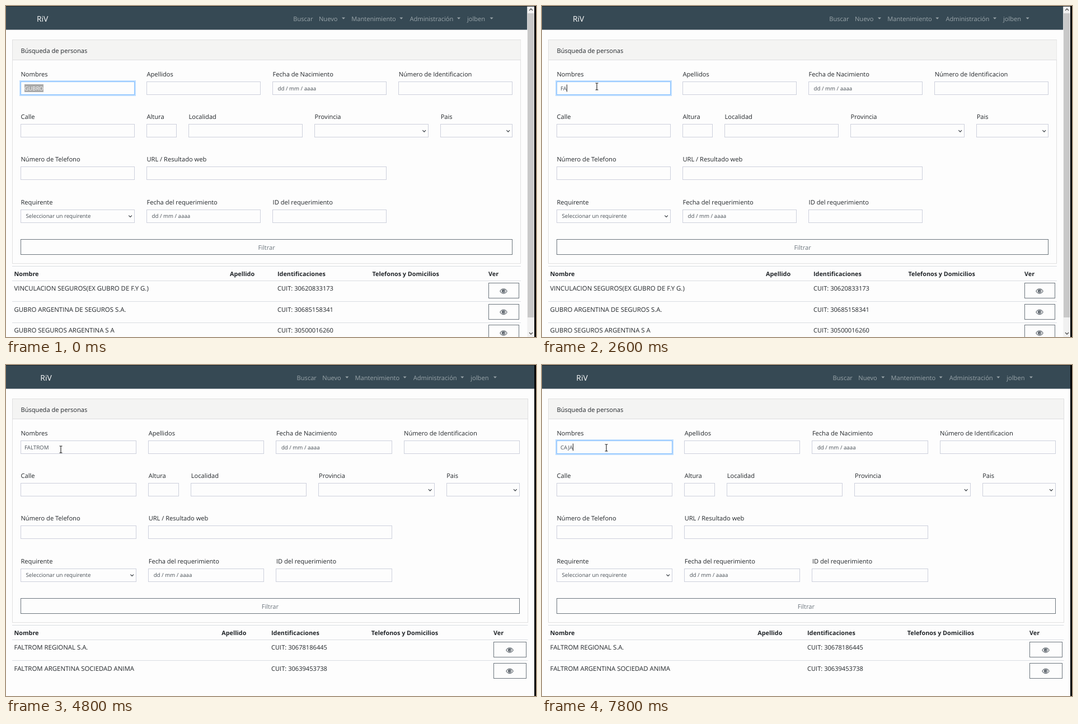
An HTML page that plays this animation: 947 px wide and 592 px high, repeating every 8 s.

```html
<!DOCTYPE html>
<html lang="es">
<head>
<meta charset="utf-8">
<title>Búsqueda de personas</title>
<style>
html, body { margin: 0; width: 100%; height: 100%; overflow: hidden; background: #fdfdfd; }
svg { display: block; width: 947px; height: 592px; }
text { font: 11.1px "Open Sans", "Noto Sans", sans-serif; fill: #212529; white-space: pre; text-rendering: geometricPrecision; }
.small { font-size: 9.7px; fill: #495057; }
.head { font-weight: 700; font-size: 10.8px; }
.name { font-size: 11.4px; }
.nav { fill: #9aa5aa; }
.brand { font-size: 13.9px; fill: #fff; }
.filter { fill: #6c757d; text-anchor: middle; }
.status { font-size: 8.4px; fill: #f2f2f2; }
</style>
</head>
<body>
<svg id="stage" viewBox="0 0 947 592"></svg>
<script>
const LOOP = 8000, STEP = 200;
const NARROW = 931.4, WIDE = 944;
const stage = document.getElementById('stage');

const text = (x, y, s, cls = '') => `<text x="${x}" y="${y}" class="${cls}">${s}</text>`;
const fill = (x, y, w, h, c) => `<rect x="${x}" y="${y}" width="${w}" height="${h}" fill="${c}"/>`;
const path = (d, attrs) => `<path d="${d}" ${attrs}/>`;

// One-pixel outline snapped to the pixel grid
function box(x, y, w, h, stroke) {
  const l = Math.round(x - .5), t = Math.round(y - .5);
  const r = Math.round(x + w - .5), b = Math.round(y + h - .5);
  return `<rect x="${l + .5}" y="${t + .5}" width="${r - l}" height="${b - t}" fill="none" stroke="${stroke}"/>`;
}

const chevron = (x, y) =>
  path(`M${x - 2.8} ${y - 1.5}l2.8 2.9 2.8-2.9`, 'fill="none" stroke="#343a40" stroke-width="1.2"');

function eye(x, y) {
  return `<g transform="translate(${x} ${y})" fill="none" stroke="#596169" stroke-width="1.1">` +
    '<path d="M-6.2 0Q-3.6-4.2 0-4.2T6.2 0Q3.6 4.2 0 4.2T-6.2 0Z"/>' +
    '<circle r="2.6"/><circle cx="-.3" cy="-.2" r="1.2" fill="#596169"/></g>';
}

// label, first column, columns, row, kind, content
const FIELDS = [
  ['Nombres', 0, 3, 0],
  ['Apellidos', 3, 3, 0],
  ['Fecha de Nacimiento', 6, 3, 0, 'date', 'dd / mm / aaaa'],
  ['Número de Identificacion', 9, 3, 0],
  ['Calle', 0, 3, 1],
  ['Altura', 3, 1, 1],
  ['Localidad', 4, 3, 1],
  ['Provincia', 7, 3, 1, 'select', ''],
  ['Pais', 10, 2, 1, 'select', ''],
  ['Número de Telefono', 0, 3, 2],
  ['URL / Resultado web', 3, 6, 2],
  ['Requirente', 0, 3, 3, 'select', 'Seleccionar un requirente'],
  ['Fecha del requerimiento', 3, 3, 3, 'date', 'dd / mm / aaaa'],
  ['ID del requerimiento', 6, 3, 3]
];
const MENU = [['Buscar', 513.3], ['Nuevo', 559, 603], ['Mantenimiento', 617.3, 706.3],
  ['Administración', 721.5, 809], ['jolben', 824, 867.6]];
const HEADS = ['Nombre', 'Apellido', 'Identificaciones', 'Telefonos y Domicilios', 'Ver'];

const BEFORE = {
  width: NARROW, cols: [14.5, 400, 485, 654.5, 862], button: 54,
  rows: [['VINCULACION SEGUROS(EX GUBRO DE F.Y G.)', '30620833173'],
    ['GUBRO ARGENTINA DE SEGUROS S.A.', '30685158341'],
    ['GUBRO SEGUROS ARGENTINA S A', '30500016260']]
};
const AFTER = {
  width: WIDE, cols: [14.5, 385.3, 474, 652.8, 871], button: 58,
  rows: [['FALTROM REGIONAL S.A.', '30678186445'],
    ['FALTROM ARGENTINA SOCIEDAD ANIMA', '30639453738']]
};

function field([label, col, span, row, kind, content], unit) {
  const x = 26.5 + col * unit, w = span * unit - 22, y = 135.5 + row * 76.2;
  let out = text(x, y - 9.5, label) + box(x, y, w, 23, '#cdd0dc');
  if (content) out += text(x + 9, y + 15.2, content, 'small');
  if (kind === 'select') out += chevron(x + w - 7.5, y + 12);
  return out;
}

function page({ width, cols, button, rows }) {
  const right = width - 11.5, inner = right - 15.2, shift = (width - NARROW) / 2;
  const unit = (inner - 26.5 + 22) / 12;
  let out = fill(0, 0, width, 592, '#fdfdfd') + fill(0, 0, width, 42.5, '#364954');
  out += text(55 + shift, 27.8, 'RiV', 'brand');
  for (const [name, x, caret] of MENU) {
    out += text(x + shift, 26.8, name, 'nav');
    if (caret) out += path(`M${caret + shift - 3} 20.6h6l-3 3.2z`, 'fill="#9aa5aa"');
  }
  out += box(11.5, 60.5, right - 11.5, 399.5, '#e0e0e0');
  out += fill(12, 61, right - 12.5, 35, '#f4f4f3') + fill(12, 96, right - 12.5, 1, '#dcdce0');
  out += text(26.5, 83.6, 'Búsqueda de personas');
  out += FIELDS.map(f => field(f, unit)).join('');
  out += box(26.5, 417, inner - 26.5, 27, '#6c757d');
  out += text((26.5 + inner) / 2, 436, 'Filtrar', 'filter');
  for (const y of [465, 491, 528, 566].slice(0, rows.length + 1))
    out += fill(11, y, right - 11, 1, '#dadde2');
  HEADS.forEach((h, i) => out += text(cols[i], 482.6, h, 'head'));
  rows.forEach(([name, id], i) => {
    const dy = i * 37.5;
    out += text(cols[0], 509.3 + dy, name, 'name') + text(cols[2], 509.3 + dy, 'CUIT: ' + id);
    out += box(cols[4], 495.6 + dy, button, 27, '#6c757d');
    out += eye(cols[4] + button / 2, 510 + dy);
  });
  return out;
}

const scrollbar = fill(NARROW, 0, WIDE - NARROW, 592, '#f1f1f1') + fill(932, 13, 11.5, 544, '#c9c9c9') +
  path('M935 8l3-3 3 3', 'fill="none" stroke="#505050" stroke-width="1.4"') +
  path('M935 584l3 3 3-3', 'fill="none" stroke="#505050" stroke-width="1.4"');

stage.innerHTML =
  `<g id="before">${page(BEFORE)}${scrollbar}</g><g id="after">${page(AFTER)}</g>` +
  fill(0, 0, 947, 1, '#1c252b') + fill(WIDE, 0, 3, 592, '#050505') +
  `<g id="ring"><rect id="glow" x="25.5" y="134.5" height="25" fill="none" stroke="#bfdeff" stroke-width="3"/>
   <rect id="edge" x="26.5" y="135.5" height="23" fill="#fdfdfd" stroke="#80bdff"/></g>
   <rect id="mark" x="33" y="140" height="14"/>
   <text id="value" x="33" y="150.7" class="small"></text>
   <rect id="caret" y="140.5" width="1" height="13" fill="#222"/>
   <g id="status">${fill(0, 577, 209.5, 15, '#26282b')}${text(2.5, 588, 'Esperando kit.fontawesome.com...', 'status')}</g>
   <g id="beam"><path d="M-2.5-6H-.8L0-5.3.8-6H2.5M0-5.3V5.3M-2.5 6H-.8L0 5.3.8 6H2.5" fill="none" stroke="#222" stroke-width="1.1"/></g>
   <path id="arrow" d="M0 0V12.2L2.9 9.6 4.8 14 6.8 13.1 4.9 8.9H8.8Z" fill="#fff" stroke="#222" stroke-width=".9"/>`;

const el = {};
stage.querySelectorAll('[id]').forEach(n => el[n.id] = n);
const show = (n, on) => n.setAttribute('display', on ? 'inline' : 'none');

// Pointer stops: time, x, y
const POINTER = [[1400, 98, 144], [3800, 98, 144], [4400, 98, 151], [4800, 98, 151],
  [5600, 187, 268], [6400, 187, 268], [6800, 115, 148], [LOOP, 115, 148]];

function pointer(t) {
  const i = POINTER.findIndex(p => p[0] > t);
  if (i < 1) return null;
  const [t0, x0, y0] = POINTER[i - 1], [t1, x1, y1] = POINTER[i];
  const k = (t - t0) / (t1 - t0), e = k * k * (3 - 2 * k);
  return [x0 + (x1 - x0) * e, y0 + (y1 - y0) * e];
}

function entry(t) {
  if (t < 2400) return 'GUBRO';
  if (t < 7400) return 'FALTROM'.slice(0, (t - 2400) / STEP + 1);
  return t < 7600 ? 'C' : t < 7800 ? 'CAJ' : 'CAJA';
}

function draw(now) {
  const t = Math.floor(now % LOOP / STEP) * STEP;
  const loaded = t >= 4800;
  const focus = t < 400 || (t >= 1400 && !loaded) || t >= 6800;
  const blue = (t >= 1400 && t < 2400) || (t >= 7000 && t < 7400);
  const selected = t < 2400 || blue;
  const typing = (t >= 2400 && t < 3800) || (t >= 4000 && t < 4400) || t === 6800 || t >= 7400;

  show(el.before, !loaded);
  show(el.after, loaded);
  show(el.ring, focus);
  const w = loaded ? 206 : 203;
  el.edge.setAttribute('width', w);
  el.glow.setAttribute('width', w + 2);

  el.value.textContent = entry(t);
  el.value.style.fill = selected ? '#fff' : '';
  const len = el.value.getComputedTextLength();
  show(el.mark, selected);
  el.mark.setAttribute('width', len);
  el.mark.setAttribute('fill', blue ? '#0078d7' : '#a9a9a9');
  show(el.caret, typing);
  el.caret.setAttribute('x', Math.round(33 + len));
  show(el.status, t >= 4400 && !loaded);

  const p = pointer(t);
  const beam = p && p[1] < 159;
  show(el.beam, beam);
  show(el.arrow, p && !beam);
  if (p) (beam ? el.beam : el.arrow).setAttribute('transform', `translate(${p[0]} ${p[1]})`);
}

const start = performance.now();
function tick() {
  draw(performance.now() - start);
  requestAnimationFrame(tick);
}
tick();
</script>
</body>
</html>
```
